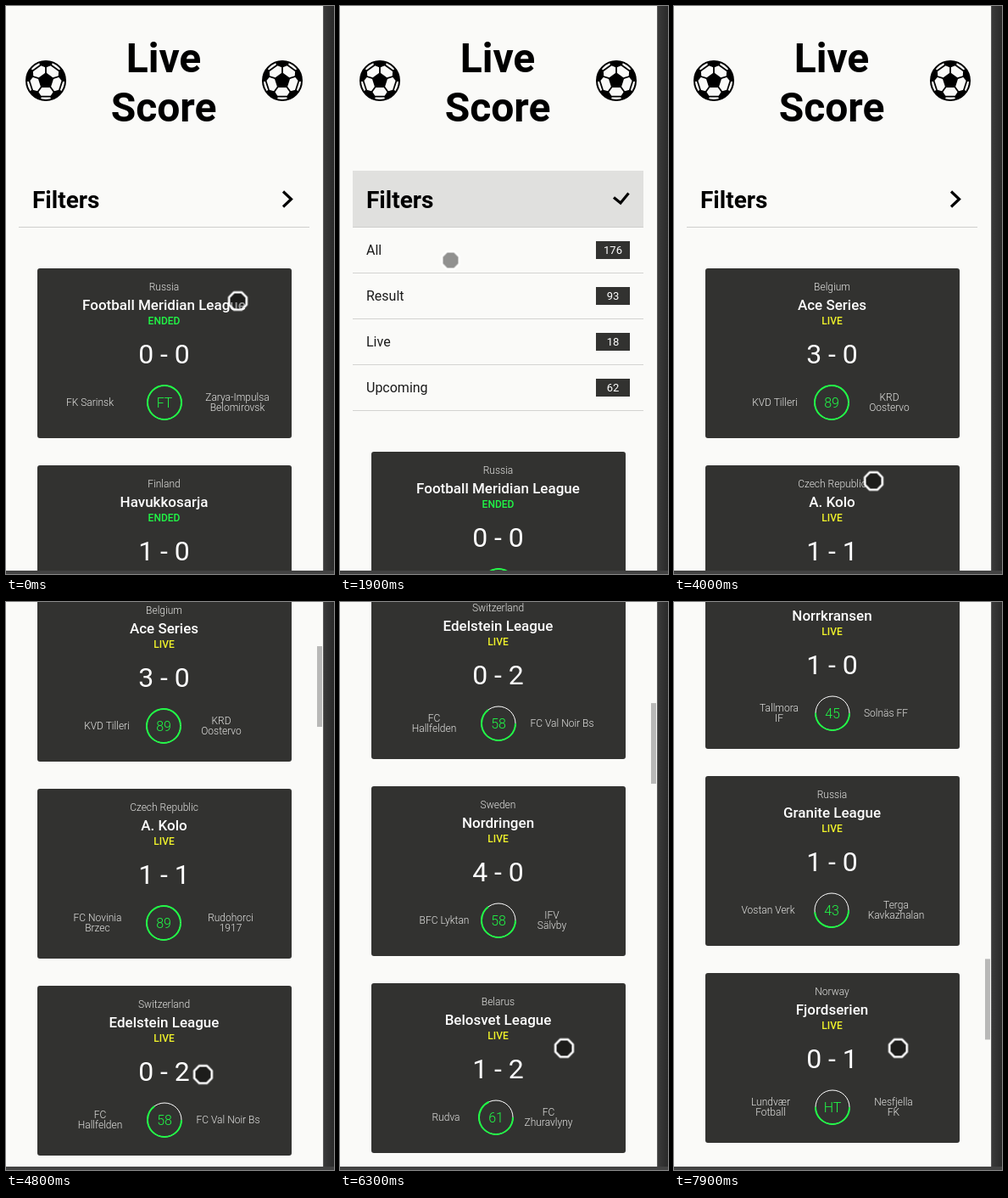
Recreate the animation shown at these times as an HTML page. Size 387x669 px, loop 8000 ms.

```html
<!DOCTYPE html>
<html lang="en">
<head>
<meta charset="utf-8">
<title>Live Score</title>
<style>
@property --y { syntax: "<number>"; inherits: true; initial-value: 0; }
@property --open { syntax: "<number>"; inherits: true; initial-value: 0; }

html, body { margin: 0; width: 100%; height: 100%; overflow: hidden; }
body {
  position: relative;
  background: linear-gradient(90deg, #5c5c5c 375px, #3a3a3a 375px, #292929 387px);
  font-family: Roboto, Inter, sans-serif;
}
body::after {
  content: ""; position: absolute; inset: 665px 0 0; background: #424242;
}
.page {
  position: absolute; width: 374px; height: 665px; overflow: hidden; background: #fafaf8;
  animation: scroll 8s -20ms infinite, fold 8s -20ms infinite;
}
.content { position: absolute; inset: 0; transform: translateY(calc(var(--y) * -1px)); }
h1, h2 { position: absolute; margin: 0; font-weight: 700; color: #000; }
h1 { left: 96px; top: 33px; width: 180px; font-size: 48px; line-height: 58px; text-align: center; }
.ball { position: absolute; top: 64px; width: 48px; height: 48px; }
.head {
  position: absolute; left: 15px; top: 194px; width: 343px; height: 66px;
  border-bottom: 1px solid #cfcfcd; background: rgb(224 224 222 / var(--open));
}
h2 { left: 16px; top: 17px; font-size: 28px; line-height: 36px; }
.head svg { position: absolute; inset: 0; }
.head path {
  fill: none; stroke: #000; stroke-width: 3.2;
  animation: tick 8s -20ms infinite;
}
.filters {
  position: absolute; left: 15px; top: 261px; width: 343px;
  height: calc(var(--open) * 216px); overflow: hidden;
}
.row {
  position: relative; box-sizing: border-box; height: 54px; padding-left: 16px;
  border-bottom: 1px solid #d3d3d1; font-size: 16px; line-height: 53px; color: #1b1b1b;
}
.row b {
  position: absolute; left: 287px; top: 16px; width: 40px; height: 21px;
  background: #323230; color: #fff; font: 400 13px/22px Roboto, sans-serif; text-align: center;
}
.list { position: absolute; left: 37px; top: calc(309px + var(--open) * 216px); }
.ended { animation: leave 8s step-end -20ms infinite; }
.live { animation: enter 8s step-end -20ms infinite; }
.card {
  position: relative; width: 300px; height: 200px; margin-bottom: 32px;
  border-radius: 3px; background: #323230; color: #fff; text-align: center;
}
.card > div { position: absolute; left: 0; width: 299px; }
.card .land { top: 14px; font: 300 12px/16px Roboto, sans-serif; color: #e4e4e2; }
.card .league { top: 31px; font: 500 17px/24px Roboto, sans-serif; }
.card .state { top: 54px; font: 500 12px/16px Roboto, sans-serif; color: #f2f52a; }
.ended .card .state { color: #20fa46; }
.card .score { top: 81px; font: 400 32px/40px Roboto, sans-serif; }
.card .team {
  width: 120px; top: 158px; transform: translate(-50%, -50%);
  font: 300 12px/12px Roboto, sans-serif; color: #e4e4e2;
}
.card svg { position: absolute; top: 136px; width: 44px; height: 44px; }
.card circle { fill: none; stroke: #fff; }
.card circle + circle { stroke: #20fa46; stroke-width: 2; }
.card text { font: 300 16px Roboto, sans-serif; fill: #20fa46; text-anchor: middle; }
.thumb {
  position: absolute; left: 367px; top: 6px; width: 6px; height: 95px; background: #b8b8b7;
  transform: translateY(calc(var(--y) * .1435px)); opacity: 0;
  animation: bar 8s -20ms infinite;
}
.pointer {
  position: absolute; left: -12px; top: -12px; width: 24px; height: 24px;
  animation: move 8s -20ms infinite;
}
.pointer path { fill: rgb(0 0 0 / .42); stroke: #fff; stroke-width: 2.6; stroke-linejoin: round; }

@keyframes scroll {
  0%, 50% { --y: 0; animation-timing-function: steps(5); }
  56.25%, 58.75% { --y: 300; animation-timing-function: steps(1); }
  60% { --y: 321; animation-timing-function: steps(4); }
  65%, 75% { --y: 578; animation-timing-function: steps(3); }
  78.75%, 80% { --y: 788; animation-timing-function: steps(4); }
  85%, 88.75% { --y: 1200; animation-timing-function: steps(1); }
  90% { --y: 1270; animation-timing-function: steps(2); }
  92.5% { --y: 1652; animation-timing-function: steps(5); }
  98.75%, 100% { --y: 2888; }
}
@keyframes fold {
  0%, 15% { --open: 0; animation-timing-function: steps(2); }
  17.5% { --open: .35; animation-timing-function: steps(2); }
  20% { --open: .85; animation-timing-function: steps(2); }
  22.5%, 35% { --open: 1; animation-timing-function: steps(2); }
  37.5% { --open: .65; animation-timing-function: steps(2); }
  40% { --open: .15; animation-timing-function: steps(2); }
  42.5%, 100% { --open: 0; }
}
@keyframes tick {
  0%, 15%, 42.5%, 100% {
    d: path("M312 24.5L321.5 33.5L312 42.5"); animation-timing-function: steps(6);
  }
  22.5%, 35% {
    d: path("M325.5 26.5L316 38L308 31.5"); animation-timing-function: steps(6);
  }
}
@keyframes leave { 0% { opacity: 1; } 36.25%, 100% { opacity: 0; } }
@keyframes enter { 0% { opacity: 0; } 36.25%, 100% { opacity: 1; } }
@keyframes bar {
  0%, 50% { opacity: 0; animation-timing-function: steps(1); }
  51.25%, 68.75% { opacity: 1; animation-timing-function: steps(3); }
  72.5%, 75% { opacity: 0; animation-timing-function: steps(1); }
  76.25%, 100% { opacity: 1; }
}
@keyframes move {
  0%, 5% { transform: translate(273.5px, 347.5px); animation-timing-function: steps(3); }
  8.75%, 10% { transform: translate(159.5px, 278.5px); animation-timing-function: steps(3); }
  13.75%, 21.25% { transform: translate(120.5px, 249.5px); animation-timing-function: steps(2); }
  23.75% { transform: translate(130.5px, 299.5px); animation-timing-function: steps(3); }
  27.5%, 28.75% { transform: translate(87px, 357px); animation-timing-function: steps(3); }
  32.5%, 42.5% { transform: translate(74.5px, 405.5px); animation-timing-function: steps(6); }
  50%, 58.75% { transform: translate(235.5px, 559.5px); animation-timing-function: steps(1); }
  60% { transform: translate(232.5px, 556.5px); animation-timing-function: steps(4); }
  65%, 100% { transform: translate(264.5px, 525.5px); }
}
</style>
</head>
<body>
<div class="page">
  <div class="content">
    <svg class="ball" style="left:23px" viewBox="-24 -24 48 48"></svg>
    <h1>Live<br>Score</h1>
    <svg class="ball" style="left:302px" viewBox="-24 -24 48 48"></svg>
    <div class="head">
      <h2>Filters</h2>
      <svg width="343" height="66"><path/></svg>
    </div>
    <div class="filters">
      <div class="row">All<b>176</b></div>
      <div class="row">Result<b>93</b></div>
      <div class="row">Live<b>18</b></div>
      <div class="row">Upcoming<b>62</b></div>
    </div>
    <div class="list ended"></div>
    <div class="list live"></div>
  </div>
  <div class="thumb"></div>
  <svg class="pointer" viewBox="-12 -12 24 24">
    <path d="M-4.4-10.3H4.4L10.3-4.4V4.4L4.4 10.3H-4.4L-10.3 4.4V-4.4Z"/>
  </svg>
</div>
<script>
// country | league | score | minute | home | away | centres of home, dial and away
const ended = `
Russia|Football Meridian League|0 - 0|FT|FK Sarinsk|Zarya-Impulsa/Belomirovsk|62 150 236
Finland|Havukkosarja|1 - 0|FT|Ruskola|Kaivonen|72 150 226`;

const live = `
Belgium|Ace Series|3 - 0|89|KVD Tilleri|KRD/Oostervo|82 149 217
Czech Republic|A. Kolo|1 - 1|89|FC Novinia/Brzec|Rudohorci/1917|71 149 228
Switzerland|Edelstein League|0 - 2|58|FC/Hallfelden|FC Val Noir Bs|74 150 225
Sweden|Nordringen|4 - 0|58|BFC Lyktan|IFV/Sälvby|86 150 213
Belarus|Belosvet League|1 - 2|61|Rudva|FC/Zhuravlyny|88 147 209
Switzerland|Edelstein League|0 - 0|56|FC Talwyl|FC Grauben|80 150 220
Switzerland|Edelstein League|1 - 2|54|Montvallon/Ariax FC|FC Lys 1912|72 149 227
Sweden|Nordringen|0 - 0|60|Solvarska FC|Granhylteds/FF|81 150 218
Sweden|Norrkransen|2 - 3|HT|Ekmora FF|BK/Lövan|82 150 211
Sweden|Norrkransen|0 - 1|45|Vikholma|Sjötorpa IF|82 150 216
Sweden|Norrkransen|2 - 0|45|Askmyra FF|Lindvalla|82 150 216
Sweden|Norrkransen|1 - 0|45|Tallmora/IF|Solnäs FF|87 150 213
Russia|Granite League|1 - 0|43|Vostan Verk|Terga/Kavkazhalan|74 149 225
Norway|Fjordserien|0 - 1|HT|Lundvær/Fotball|Nesfjella/FK|77 150 222`;

const GAME = 90, RING = 2 * Math.PI * 20;

function card(line, state) {
  const [land, league, score, minute, home, away, centres] = line.split("|");
  const [left, mid, right] = centres.split(" ").map(Number);
  const played = { FT: GAME, HT: GAME / 2 }[minute] ?? +minute;
  const team = (name, x) =>
    `<div class="team" style="left:${x}px">${name.replace("/", "<br>")}</div>`;
  return `<div class="card">
    <div class="land">${land}</div><div class="league">${league}</div>
    <div class="state">${state}</div><div class="score">${score}</div>
    ${team(home, left)}${team(away, right)}
    <svg style="left:${mid - 22}px" viewBox="-22 -22 44 44"><circle r="20"/>
      <circle r="20" stroke-dasharray="${RING * played / GAME} ${RING}"/>
      <text y="5.5">${minute}</text></svg></div>`;
}

function fill(selector, data, state) {
  document.querySelector(selector).innerHTML =
    data.trim().split("\n").map(line => card(line, state)).join("");
}

// Ball: a middle pentagon, seams and five patches at the rim
function ball() {
  const at = (r, deg) => {
    const a = (deg - 90) * Math.PI / 180;
    return `${(r * Math.cos(a)).toFixed(2)} ${(r * Math.sin(a)).toFixed(2)}`;
  };
  const middle = [];
  let patches = "", seams = "";
  for (let a = 0; a < 360; a += 72) {
    middle.push(at(9.8, a));
    seams += `M${at(9, a)}L${at(17, a)}M${at(19.5, a + 18)}L${at(19.5, a + 54)}`;
    patches += `M${at(15.5, a)}L${at(19.5, a + 21)}L${at(23.4, a + 20)}`
      + `L${at(23.4, a)}L${at(23.4, a - 20)}L${at(19.5, a - 21)}Z`;
  }
  return `<circle r="23" fill="#fafaf8" stroke="#000" stroke-width="2"/>
    <path d="M${middle.join("L")}Z${patches}"/>
    <path d="${seams}" stroke="#000" stroke-width="1.8"/>`;
}

fill(".ended", ended, "ENDED");
fill(".live", live, "LIVE");
document.querySelectorAll(".ball").forEach(el => el.innerHTML = ball());
</script>
</body>
</html>
```
